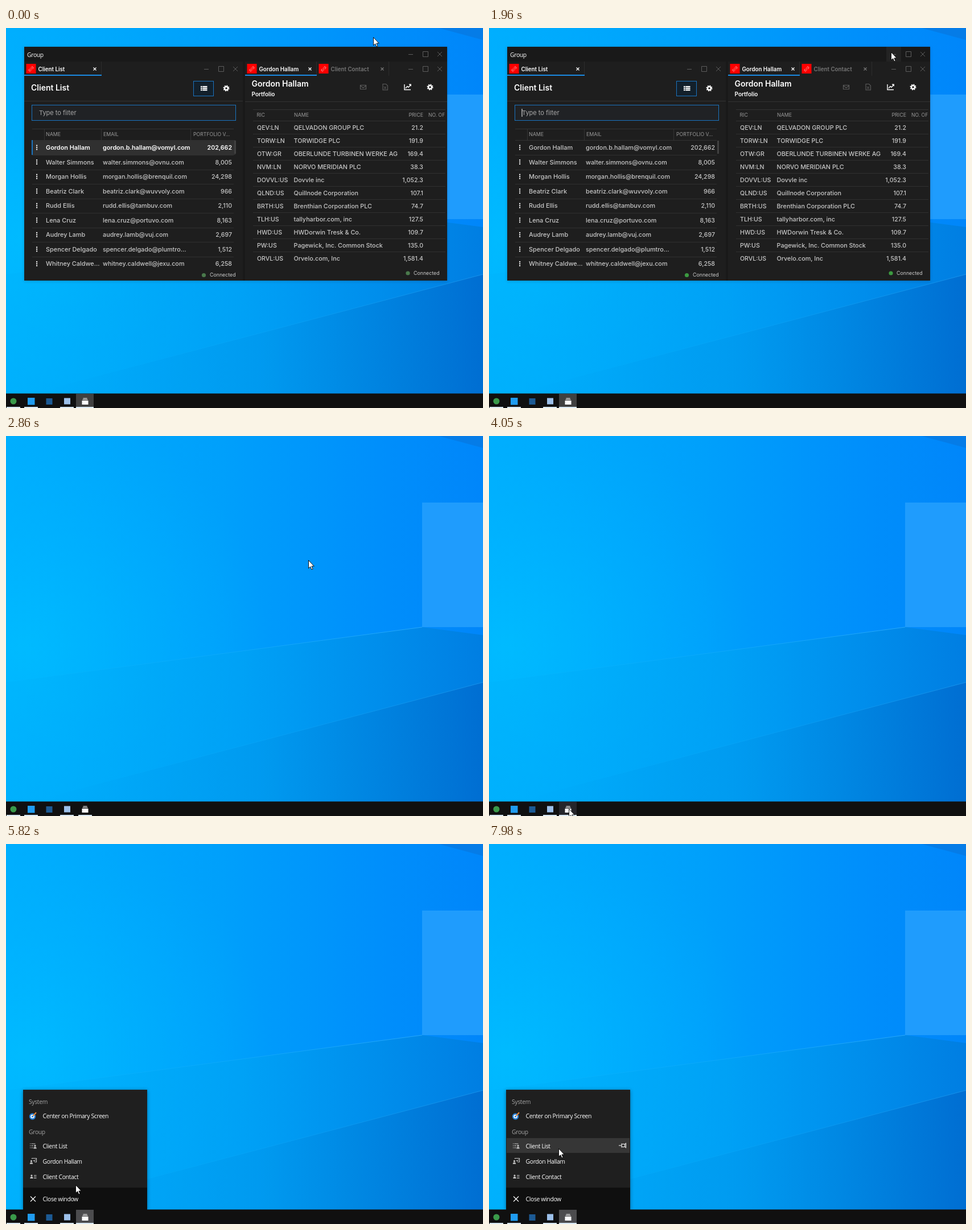
These frames come from a looping animation (838x668 px, 8 s). An HTML page:

```html
<!DOCTYPE html>
<html lang="en">
<head>
<meta charset="utf-8">
<title>Group window</title>
<style>
html, body { margin: 0; width: 100%; height: 100%; overflow: hidden; background: #00a4fc; }
svg { display: block; width: 838px; height: 668px; }
text { font-family: Inter, "Open Sans", sans-serif; white-space: pre; }
.sys { font-family: "Open Sans", "Noto Sans", sans-serif; letter-spacing: -.35px; }
#win { filter: drop-shadow(0 1px 2.5px rgba(0, 0, 0, .2)); }
#menu { filter: drop-shadow(0 1px 3px rgba(0, 0, 0, .4)); }
</style>
</head>
<body>
<svg id="stage" viewBox="0 0 838 668" xmlns="http://www.w3.org/2000/svg"></svg>
<script>
const LOOP = 8000;

const rect = (x, y, w, h, fill, more = '') =>
  `<rect x="${x}" y="${y}" width="${w}" height="${h}" fill="${fill}" ${more}/>`;
const path = (d, stroke, width = 1, more = 'fill="none"') =>
  `<path d="${d}" stroke="${stroke}" stroke-width="${width}" ${more}/>`;
const dot = (x, y, r, fill, more = '') =>
  `<circle cx="${x}" cy="${y}" r="${r}" fill="${fill}" ${more}/>`;
const text = (x, y, s, size, fill, weight = 400, more = '') =>
  `<text x="${x}" y="${y}" font-size="${size}" fill="${fill}" font-weight="${weight}" ${more}>${s.replace(/&/g, '&amp;')}</text>`;
const sys = (x, y, s, fill = '#fff') => text(x, y, s, 10.4, fill, 400, 'class="sys"');
const END = 'text-anchor="end"';
const GREY = '#5c5c5c', LINE = '#333', BLUE = '#1a74c0';

const clients = [
  ['Gordon Hallam', 'gordon.b.hallam@vomyl.com', '202,662'],
  ['Walter Simmons', 'walter.simmons@ovnu.com', '8,005'],
  ['Morgan Hollis', 'morgan.hollis@brenquil.com', '24,298'],
  ['Beatriz Clark', 'beatriz.clark@wuvvoly.com', '966'],
  ['Rudd Ellis', 'rudd.ellis@tambuv.com', '2,110'],
  ['Lena Cruz', 'lena.cruz@portuvo.com', '8,163'],
  ['Audrey Lamb', 'audrey.lamb@vuj.com', '2,697'],
  ['Spencer Delgado', 'spencer.delgado@plumtro...', '1,512'],
  ['Whitney Caldwe...', 'whitney.caldwell@jexu.com', '6,258']
];
const stocks = [
  ['QEV:LN', 'QELVADON GROUP PLC', '21.2'],
  ['TORW:LN', 'TORWIDGE PLC', '191.9'],
  ['OTW:GR', 'OBERLUNDE TURBINEN WERKE AG', '169.4'],
  ['NVM:LN', 'NORVO MERIDIAN PLC', '38.3'],
  ['DOVVL:US', 'Dovvle inc', '1,052.3'],
  ['QLND:US', 'Quillnode Corporation', '107.1'],
  ['BRTH:US', 'Brenthian Corporation PLC', '74.7'],
  ['TLH:US', 'tallyharbor.com, inc', '127.5'],
  ['HWD:US', 'HWDorwin Tresk & Co.', '109.7'],
  ['PW:US', 'Pagewick, Inc. Common Stock', '135.0'],
  ['ORVL:US', 'Orvelo.com, Inc', '1,581.4']
];

function wallpaper() {
  const stops = list => list.map(([o, c, a = 1]) =>
    `<stop offset="${o}" stop-color="${c}" stop-opacity="${a}"/>`).join('');
  const linear = (id, list) => `<linearGradient id="${id}">${stops(list)}</linearGradient>`;
  return `<defs>
    ${linear('sky', [[0, '#00aefe'], [.45, '#00a0fb'], [.8, '#008efb'], [1, '#0086fa']])}
    ${linear('floor', [[0, '#00b2fa', .3], [.5, '#00a2f4', .75], [1, '#007ee2']])}
    ${linear('deep', [[0, '#009ff0', 0], [.5, '#0095ea', .5], [.75, '#0082de', .8], [1, '#006ed2']])}
    ${linear('ray', [[0, '#20c0ff', 0], [.5, '#20b4ff', .35], [1, '#38b4ff', .7]])}
    <radialGradient id="glow" gradientUnits="userSpaceOnUse" cx="30" cy="370" r="430">
      ${stops([[0, '#00bcff', .9], [1, '#00b0ff', 0]])}</radialGradient>
    <clipPath id="above">${rect(10, 410, 260, 233, '#000')}</clipPath>
  </defs>` +
    rect(0, 0, 838, 668, 'url(#sky)') + rect(0, 0, 838, 668, 'url(#glow)') +
    '<path d="M760 0L838 21V0Z" fill="#0878e0" opacity=".7"/>' +
    '<path d="M0 433L731 336L838 350V643H0Z" fill="url(#floor)"/>' +
    '<path d="M100 628L838 433V643H60Z" fill="url(#deep)"/>' +
    path('M0 433L731 336', 'url(#ray)') + path('M160 612L838 433', 'url(#ray)', .6) +
    rect(731, 117, 219, 219, '#1f9cfd');
}

const controls = (y, x) =>
  path(`M${x - 4} ${y + .5}h8`, GREY) + path(`M${x + 21.5} ${y - 4.5}h9v9h-9z`, GREY) +
  path(`M${x + 47} ${y - 4}l8 8m0-8l-8 8`, GREY);

const gear = (x, y) =>
  dot(x, y, 3, 'none', 'stroke="#fff" stroke-width="2.4"') +
  dot(x, y, 4.7, 'none', 'stroke="#fff" stroke-width="1.7" stroke-dasharray="1.85 1.84"');

function tab(x, w, label, active) {
  const ink = active ? '#fff' : '#777', y = 72;
  const link = `<g transform="translate(${x + 12} ${y}) rotate(-45)">` +
    path('M-1 -1.7h-2a1.7 1.7 0 0 0 0 3.4h2M1 -1.7h2a1.7 1.7 0 0 1 0 3.4h-2M-1.7 0h3.4', '#ffb0b0', .9) + '</g>';
  return path(`M${x + w - .5} 59v25`, '#2c2c2c') +
    rect(x + 3.5, 63, 17, 17, '#f00') + link +
    text(x + 24.5, 76, label, 9.75, ink, 600) +
    path(`M${x + w - 14.5} 69.5l5 5m0-5l-5 5`, ink, 1.2) +
    (active ? rect(x, 82, w, 2, '#1a8ae2') : '');
}

function clientPanel() {
  let s = rect(32, 59, 384, 385, '#1e1e1e') + tab(32, 136, 'Client List', true) + controls(72, 352) +
    text(44, 110, 'Client List', 14, '#fff', 600) +
    rect(329.5, 93.5, 35, 26, '#13202b', `stroke="${BLUE}"`);
  for (let i = 0; i < 3; i++)
    s += rect(342, 102 + i * 3, 2.5, 2.2, '#fff') + rect(345.3, 102 + i * 3, 8.2, 2.2, '#fff');
  s += gear(387, 106) + path('M32 128.5h384', LINE) +
    rect(45.5, 135.5, 358, 27, '#202225', `stroke="${BLUE}"`) +
    text(58, 153, 'Type to filter', 11, '#a8a8a8') +
    rect(57.5, 142, 1, 14, '#fff', 'id="caret"') +
    path('M46 177.5H400M46 197.5H400M67.5 177v20M167.5 177v20M324.5 177v20', LINE) +
    text(70, 190, 'NAME', 8.9, '#999') + text(171, 190, 'EMAIL', 8.9, '#999') +
    text(329, 190, 'PORTFOLIO V...', 8.7, '#999') +
    '<g id="picked">' + rect(45, 197, 358, 26, '#303030') + rect(45, 197, 2, 26, BLUE) + '</g>' +
    rect(401, 198, 3, 23, '#414141');
  clients.forEach(([name, mail, sum], i) => {
    const y = 210 + i * 25.55;
    for (const d of [-3.4, 0, 3.4]) s += rect(53, y + d - 1.1, 2.2, 2.2, '#e4e4e4');
    s += `<g fill="#c8c8c8" font-weight="500"${i ? '' : ' id="first"'}>` +
      text(70, y + 4, name, 10.9, 'inherit', 'inherit') +
      text(170, y + 4, mail, 10.8, 'inherit', 'inherit') +
      text(397, y + 4, sum, 10.6, 'inherit', 'inherit', END) + '</g>';
    if (i < 8) s += path(`M46 ${Math.round(y + 13) + .5}H400`, '#303030');
  });
  return s.replace(/fill="inherit" font-weight="inherit"/g, '') +
    dot(347.5, 434.5, 3.6, '#4a7a4c', 'class="lamp"') + text(358, 437.3, 'Connected', 8.8, '#ccc');
}

function stockPanel() {
  let s = rect(420, 59, 355, 385, '#1e1e1e') + tab(420, 126, 'Gordon Hallam', true) +
    tab(546, 127, 'Client Contact', false) + controls(72, 711) +
    text(431.5, 103, 'Gordon Hallam', 14, '#fff', 600) + text(431.5, 119.5, 'Portfolio', 10, '#fff', 600) +
    path('M622.5 100.5h10v7h-10zM622.5 101.5l5 3.5l5-3.5', GREY, 1.2) +
    path('M662 98.5h5.5l3 3v7.5h-8.5zM664 103l4 4.5m0-4.5l-4 4.5', GREY, 1.1) +
    path('M700 99v9.5h11M702 106l3-3.5l2 1.8l4-4.6M708 99.3h3.2v3', '#fff', 1.4) +
    gear(745, 104) + path('M420 129.5h355M434 143.5h338M434 163.5h338', LINE) +
    text(440.5, 156, 'RIC', 8.7, '#999') + text(506, 156, 'NAME', 8.9, '#999') +
    text(733, 156, 'PRICE', 8.9, '#999', 400, END) + text(742, 156, 'NO. OF', 8.6, '#999');
  stocks.forEach(([code, name, price], i) => {
    const y = 179 + i * 23;
    s += text(441, y, code, 10.6, '#c8c8c8', 500) + text(505.5, y, name, 10.8, '#c8c8c8', 500) +
      text(733, y, price, 10.6, '#c8c8c8', 500, END);
    if (i < 10) s += path(`M434 ${y + 7.5}h338`, '#303030');
  });
  return s + dot(706, 431, 3.6, '#4a7a4c', 'class="lamp"') + text(716, 434.2, 'Connected', 8.8, '#ccc');
}

const groupWindow = () => '<g id="win">' +
  rect(32, 33, 743, 411, '#191919') + sys(37, 50.5, 'Group') +
  rect(698, 33, 26, 26, '#232323', 'id="hover"') + controls(46, 711) +
  clientPanel() + stockPanel() + '</g>';

function jumpList() {
  const ink = '#c4c4c4';
  const person = (x, y) => dot(x, y - 1.6, 1.6, ink) + `<path d="M${x - 2.7} ${y + 3.5}q0-3 2.7-3t2.7 3z" fill="${ink}"/>`;
  return '<g clip-path="url(#above)"><g id="menu">' +
    rect(30, 432, 218, 172, '#1f1f1f') + rect(30, 604, 218, 39, '#0f0f0f') +
    '<g id="row">' + rect(31, 0, 216, 26, '#363636') +
    '<g id="pin">' + path('M228 13h5M233 9.5v7M233 10.5h5.5v5h-5.5M240.5 8.5v9M238.5 10.5l2-1M238.5 15.5l2 1', '#fff') + '</g></g>' +
    sys(40, 457, 'System', '#a4a4a4') +
    dot(46.5, 479, 4.5, '#fff', 'stroke="#2680d8" stroke-width="2.4"') + dot(46.5, 479, 1.6, '#2680d8') +
    path('M47.5 478L53 472', '#e8893a', 2) +
    sys(64.5, 482, 'Center on Primary Screen') +
    sys(40, 510, 'Group', '#a4a4a4') +
    path('M42 527h1.3M44.5 527h7M42 530.5h1.3M44.5 530.5h3.5M42 534h1.3M44.5 534h3', ink, 1.2) + person(51, 532) +
    sys(64.5, 535, 'Client List') +
    path('M45.5 553.5v-1h8v6.5h-3.5M48 556l1.5 1.5l2.7-3', ink, 1.1) + person(44.5, 559) +
    sys(64.5, 562, 'Gordon Hallam') +
    person(45, 584.5) + path('M49 582.5h4.5M49 585h4.5M49 587.5h4.5', ink, 1.2) +
    sys(64.5, 589, 'Client Contact') +
    path('M43 619.5l9 9m0-9l-9 9', '#fff', 1.1) +
    sys(64.5, 628, 'Close window') + '</g></g>';
}

const taskbar = () => rect(0, 642.5, 838, 26, '#101010') +
  rect(123, 643, 31, 25, '#404040', 'id="button"') +
  dot(13, 656, 5.5, '#3a9a4a') + rect(38, 650, 12.5, 12.5, '#1f9cf0') +
  rect(70.5, 651, 11, 11, '#1c5a94') + rect(102, 650.5, 11, 11, '#9cc0ea') +
  rect(135.5, 650.5, 7, 1.2, '#ddd') + rect(134.5, 652.7, 9, 1.2, '#ddd') + rect(133.5, 655, 11, 7, '#fff') +
  [1, 32, 95].map(x => rect(x, 666, 24, 2, '#d8e8f4')).join('') +
  rect(123, 666, 31, 2, '#d8e8f4', 'id="mark"');

document.getElementById('stage').innerHTML = wallpaper() + groupWindow() + jumpList() + taskbar() +
  path('M.5 .5V14.6L3.7 11.7L5.9 16.8L8.1 15.9L5.9 10.9H10.3Z', '#000', .9, 'fill="#fff" id="cursor"');

const $ = id => document.getElementById(id);
const show = (id, on) => $(id).setAttribute('visibility', on ? 'inherit' : 'hidden');
const set = (id, attrs) => { for (const k in attrs) $(id).setAttribute(k, attrs[k]); };
const clamp = v => Math.max(0, Math.min(1, v));
const ease = {
  lin: p => p,
  in: p => p ** 1.6,
  out: p => 1 - (1 - p) ** 2,
  both: p => p * p * (3 - 2 * p)
};

// time, x, y, easing towards this point
const track = [
  [0, 645, 16, 'lin'], [70, 645, 16, 'lin'], [820, 670, 16, 'in'], [1290, 705, 40, 'out'],
  [1490, 705, 40, 'lin'], [1560, 706, 42, 'lin'], [2130, 706, 42, 'lin'], [2580, 659, 79, 'in'],
  [3420, 169, 611, 'both'], [4050, 140, 655, 'out'], [5230, 140, 655, 'lin'], [6030, 118, 588, 'both'],
  [6330, 118, 588, 'lin'], [6910, 118, 558, 'both'], [7720, 118, 558, 'lin'], [7980, 122, 535, 'both'],
  [LOOP, 122, 535, 'lin']
];
// top, height of the hit area, top of the highlight
const rows = [[517, 27, 517], [544, 27, 544.5], [571, 27, 572], [604, 39, 611]];

function cursorAt(t) {
  const i = Math.max(1, track.findIndex(k => k[0] > t));
  const [t0, x0, y0] = track[i - 1], [t1, x1, y1, kind] = track[i];
  const p = ease[kind]((t - t0) / (t1 - t0));
  return [Math.round(x0 + (x1 - x0) * p), Math.round(y0 + (y1 - y0) * p)];
}

function draw(t) {
  const [x, y] = cursorAt(t);
  set('cursor', { transform: `translate(${x} ${y})` });

  const shrink = t < 2030 ? 0 : t < 2100 ? .3 : 1;
  show('win', t < 2170);
  set('win', {
    transform: `translate(${32 + 48 * shrink} ${33 + 296 * shrink}) scale(${1 - .481 * shrink}) translate(-32 -33)`,
    opacity: 1 - .87 * shrink
  });
  show('hover', t >= 1820);
  show('caret', t >= 430 && (t - 430) % 1060 < 530);
  show('picked', t < 420);
  set('first', t < 420 ? { fill: '#fff', 'font-weight': 600 } : { fill: '#c8c8c8', 'font-weight': 500 });
  for (const lamp of document.querySelectorAll('.lamp'))
    lamp.setAttribute('fill', t < 1820 ? '#4a7a4c' : '#3c9a40');

  const rise = ease.out(clamp((t - 4450) / 350));
  show('menu', t > 4450);
  set('menu', { transform: `translate(0 ${110 * (1 - rise)})`, opacity: rise });
  const row = t > 5230 && rows.find(([top, h]) => y >= top && y < top + h);
  show('row', row);
  if (row) {
    set('row', { transform: `translate(0 ${row[2]})` });
    show('pin', row[0] < 604);
  } else show('pin', false);

  const over = t > 3000 && y > 643;
  const lit = t < 2100 || over || t >= 4450;
  show('button', lit);
  set('button', { fill: t < 2100 ? '#404040' : t < 4450 ? '#25252a' : '#4c4c4e' });
  set('mark', lit ? { x: 123, width: 31 } : { x: 127, width: 24 });
}

const start = performance.now();
function tick() {
  draw((performance.now() - start) % LOOP);
  requestAnimationFrame(tick);
}
tick();
</script>
</body>
</html>
```
